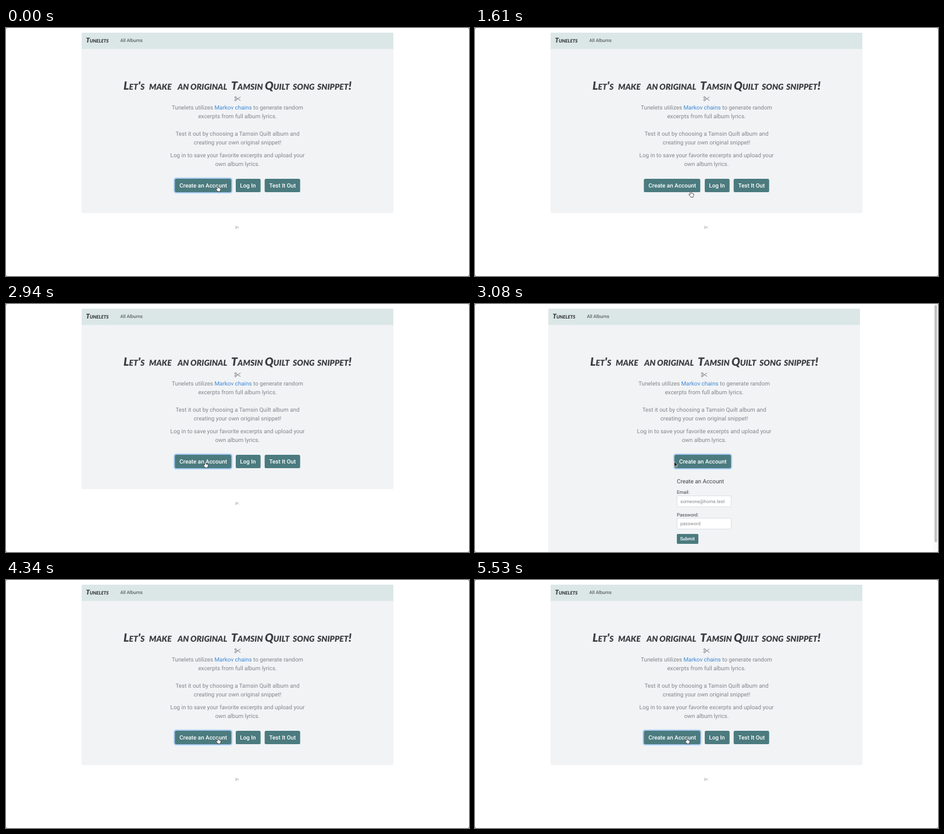
Animation of 796x426 px, one loop 5.67 s. Source, as an HTML page:

```html
<!DOCTYPE html>
<html lang="en">
<head>
<meta charset="utf-8">
<title>Tunelets</title>
<style>
  html, body { margin: 0; width: 100%; height: 100%; overflow: hidden; background: #999; }
  svg { display: block; width: 796px; height: 426px; border-radius: 3px; background: #fff; }
  text { font: 9.9px Roboto, sans-serif; fill: #83878b; text-rendering: geometricPrecision; }
  .marker { font: italic 900 19.5px Lato, sans-serif; font-variant: small-caps; fill: #3b3d40; }
  .brand { font-size: 11.3px; }
  .intro text { text-anchor: middle; }
  .link { fill: #4089d6; }
  .dark { fill: #3e4246; }
  .small { font-size: 8px; }
  .button rect { fill: #4b7b7f; }
  .button text { fill: #fff; font-weight: 500; }
  .focus rect { fill: none; }
  .field { fill: #fff; stroke: #d3d9de; stroke-width: .8; }
</style>
</head>
<body>
<svg viewBox="0 0 796 426">
  <defs>
    <g id="scissors" fill="none" stroke="#6f7275" stroke-width=".9">
      <circle cx="-3.4" cy="-2.3" r="1.4"/>
      <circle cx="-3.4" cy="2.3" r="1.4"/>
      <path d="M-2.2 -1.5L5.2 3M-2.2 1.5L5.2 -3"/>
    </g>
    <g id="ring" class="focus">
      <rect x="-1.2" y="-1.2" width="99.4" height="25.4" rx="3.5" stroke="#b9d6f6" stroke-width="2"/>
      <rect x="-.3" y="-.3" width="97.6" height="23.6" rx="3" stroke="#7fb0e4" stroke-width=".8"/>
    </g>
    <g id="create" class="button">
      <rect width="97" height="23" rx="2.6"/>
      <text x="8" y="15.2">Create an Account</text>
    </g>
  </defs>

  <g id="page">
    <rect id="panel" x="130" y="8" width="536" height="310" rx="2.5" fill="#f1f3f5"/>
    <path d="M130 36V10q0-2 2-2H664q2 0 2 2V36z" fill="#dbe7e6"/>
    <text class="marker brand" x="137.5" y="25">Tunelets</text>
    <text class="dark small" x="196.5" y="24.3">All Albums</text>
    <text class="marker" y="106.3"><tspan x="202">Let's</tspan> <tspan x="246">make</tspan> <tspan x="295">an</tspan> <tspan x="317">original</tspan> <tspan x="387">Tamsin</tspan> <tspan x="445">Quilt</tspan> <tspan x="493">song</tspan> <tspan x="535">snippet!</tspan></text>
    <use href="#scissors" x="398" y="121.5"/>
    <g class="intro">
      <text x="398" y="139.6">Tunelets utilizes <tspan class="link">Markov chains</tspan> to generate random</text>
      <text x="398" y="154.6">excerpts from full album lyrics.</text>
      <text x="398" y="184.6">Test it out by choosing a Tamsin Quilt album and</text>
      <text x="398" y="199.6">creating your own original snippet!</text>
      <text x="398" y="222.2">Log in to save your favorite excerpts and upload your</text>
      <text x="398" y="237.2">own album lyrics.</text>
    </g>
  </g>

  <g id="closed">
    <g class="button">
      <rect x="395" y="259" width="42.7" height="23" rx="2.6"/>
      <text x="402.3" y="274.2">Log In</text>
      <rect x="444.7" y="259" width="61" height="23" rx="2.6"/>
      <text x="452.5" y="274.2">Test It Out</text>
    </g>
    <use href="#scissors" transform="translate(397.4 342.5) scale(.58)" opacity=".85"/>
  </g>

  <g id="form">
    <text class="dark" x="347" y="307.8">Create an Account</text>
    <text class="dark small" x="347" y="326">Email:</text>
    <rect class="field" x="347.4" y="329.6" width="93" height="18.8" rx="1.5"/>
    <text class="small" x="353" y="341.8">someone@home.test</text>
    <text class="dark small" x="347" y="364.8">Password:</text>
    <rect class="field" x="347.4" y="368" width="93" height="18.6" rx="1.5"/>
    <text class="small" x="353" y="380.2">password</text>
    <g class="button">
      <rect x="347" y="395" width="37" height="17" rx="1.8"/>
      <text class="small" x="352.5" y="406.4">Submit</text>
    </g>
    <rect x="788" width="8" height="426" fill="#fafafa"/>
    <rect x="790" y="1.5" width="4.4" height="408" rx="2.2" fill="#c2c2c2"/>
  </g>

  <g id="button">
    <use id="glow" href="#ring"/>
    <use href="#create"/>
  </g>

  <g id="pointer" stroke-linejoin="round">
    <path id="hand" d="M-1 1a1 1 0 0 1 2 0V4l3.2.7q1.1.3 1 1.4l-.5 2.2-.6 1.4v.8h-4.3v-.8q-1.8-1.3-3-3.4-.3-1.1.8-1.1L-1 6.2z" fill="#fff" stroke="#222" stroke-width=".75"/>
    <path id="arrow" d="M0 0V8.6L2 6.8 3.3 9.8 4.8 9.2 3.5 6.2H6.2z" fill="#111" stroke="#fff" stroke-width=".7"/>
  </g>
</svg>
<script>
const LOOP = 5670, STEP = 70;
const OPEN = 3080, CLOSE = 4340, BLUR = 1260, PRESS = 2940;
// Pointer tip: time, x, y
const path = [
  [0, 364, 270.5], [1120, 364, 270.5], [1260, 370, 297], [1330, 370, 297],
  [1610, 371, 280], [1820, 371, 280], [2240, 342.5, 270.8], [3360, 342.5, 270.8],
  [3710, 368, 270.8], [3850, 364.3, 270.8], [LOOP, 364.3, 270.8]
];
const el = id => document.getElementById(id);
const show = (id, visible) => el(id).style.display = visible ? "" : "none";
const move = (id, x, y) => el(id).setAttribute("transform", `translate(${x} ${y})`);

function tipAt(t) {
  const i = path.findIndex(p => p[0] > t);
  const [t0, x0, y0] = path[i - 1], [t1, x1, y1] = path[i];
  const u = (t - t0) / (t1 - t0), k = u * u * (3 - 2 * u);
  return [x0 + (x1 - x0) * k, y0 + (y1 - y0) * k];
}

function draw(now) {
  const t = Math.floor(now % LOOP / STEP) * STEP;
  const open = t >= OPEN && t < CLOSE;
  const [x, y] = tipAt(t);
  const onButton = y <= 282 && !(open && x < 344);

  move("page", open ? -4 : 0, 0);
  el("panel").setAttribute("height", open ? 430 : 310);
  show("closed", !open);
  show("form", open);
  move("button", open ? 343 : 290.3, 259);
  show("glow", t < BLUR || t >= PRESS);
  move("pointer", x, y);
  show("hand", onButton);
  show("arrow", !onButton);
}

const start = performance.now();
function tick() {
  draw(performance.now() - start);
  requestAnimationFrame(tick);
}
tick();
</script>
</body>
</html>
```
